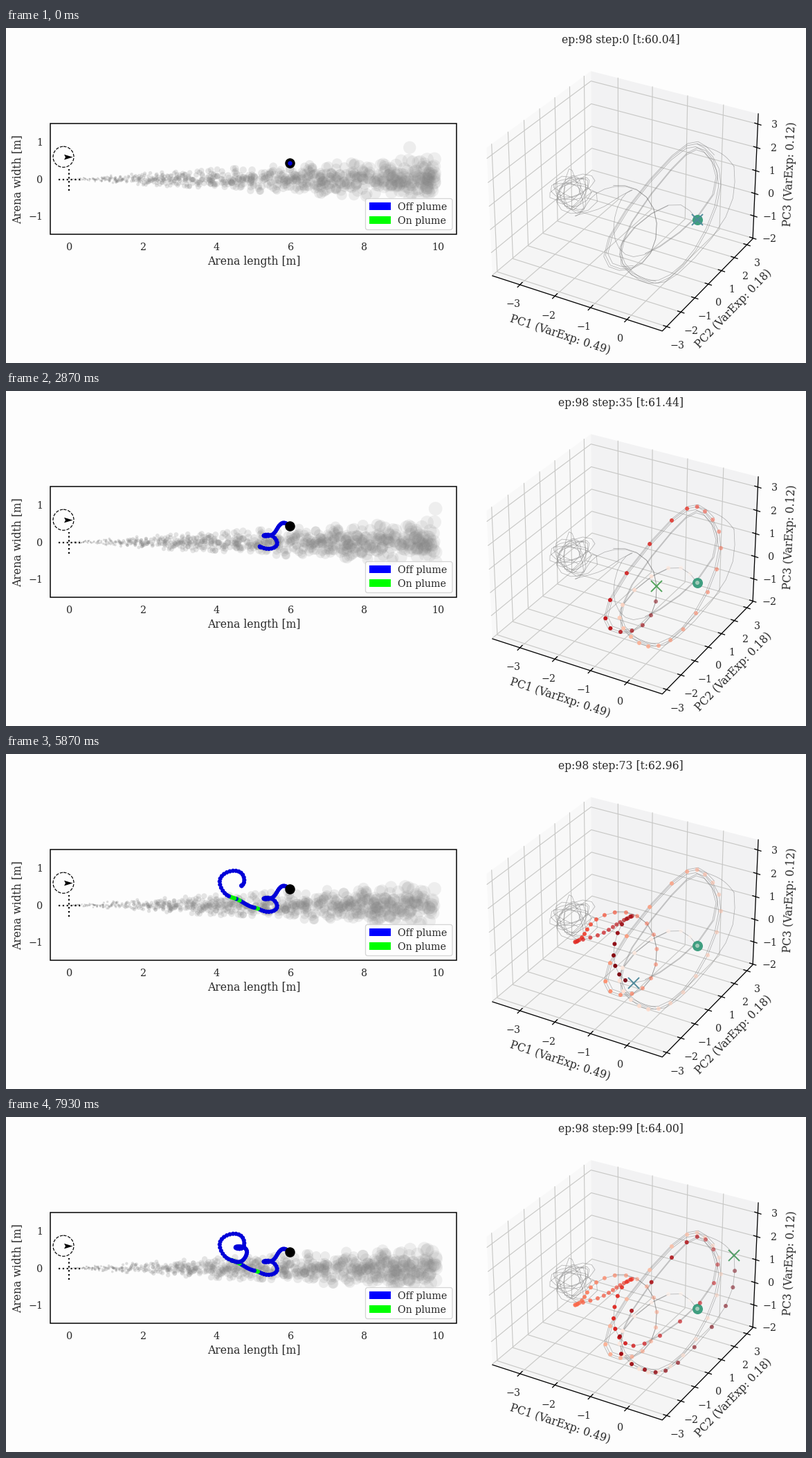
A matplotlib script for the animation above (8 s loop, 1156 by 484 pixels).

```python
import numpy as np
import matplotlib
import matplotlib.pyplot as plt
from matplotlib.animation import FuncAnimation
from matplotlib.patches import Circle, FancyBboxPatch, Polygon, Rectangle

W, H = 1156, 484
N, LOOP_MS = 100, 8000       # one simulation step per frame
INK, BLUE, GREEN, TEAL = "#262626", "#0000d8", "#00f000", "#3f9e80"
TICK, LABEL = 14.2, 15.6
M = 53.3                     # pixels per metre
OX, OY = 91.3, 218.3         # plume source in pixels

plt.rcParams["font.family"] = "DejaVu Serif"
rng = np.random.default_rng(98)
STEPS = np.arange(N)

# One point equals one pixel; all drawing is in pixel coordinates.
fig = plt.figure(figsize=(W / 72, H / 72), dpi=72, facecolor="#fdfdfd")
ax = fig.add_axes([0, 0, 1, 1])
ax.set(xlim=(0, W), ylim=(H, 0))
ax.axis("off")


def text(x, y, s, size=TICK, **kw):
    kw = {"ha": "center", "va": "baseline", **kw}
    return ax.text(x, y, s, size=size, color=INK, zorder=10, **kw)


def line(pts, color="black", lw=1.3, z=3, **kw):
    ax.plot(*np.array(pts, float).T, color=color, lw=lw, zorder=z, **kw)


def num(v):
    return str(v).replace("-", "\u2212")


def curve(pts, n=N):
    """n points along the natural cubic spline through evenly timed pts."""
    p = np.array(pts, float)
    c = len(p)
    a = 4 * np.eye(c) + np.eye(c, k=1) + np.eye(c, k=-1)
    a[0, 0] = a[-1, -1] = 2
    q = np.pad(p, ((1, 1), (0, 0)), "edge")
    m = np.linalg.solve(a, 3 * (q[2:] - q[:-2]))
    t = np.linspace(0, c - 1, n)
    k = np.minimum(t.astype(int), c - 2)
    u = (t - k)[:, None]
    return ((1 + 2 * u) * (1 - u) ** 2 * p[k] + u * (1 - u) ** 2 * m[k]
            + u * u * (3 - 2 * u) * p[k + 1] + u * u * (u - 1) * m[k + 1])


# ---------------------------------------------------------------- arena

def draw_arena():
    ax.add_patch(Rectangle((64.2, 138.3), 586.8, 160, fill=False, ec="black",
                           lw=1.5, zorder=8))
    for v in range(0, 11, 2):
        text(OX + M * v, 321.4, num(v))
    for v in (-1, 0, 1):
        text(53, OY - M * v + 5.2, num(v), ha="right")
    text(358.3, 342.4, "Arena length [m]", LABEL)
    text(21.5, 219, "Arena width [m]", LABEL, rotation=90,
         rotation_mode="anchor")

    # wind compass and source cross
    ax.add_patch(Circle((83, 186.2), 15, fill=False, ec="black", lw=1.2,
                        ls="--", zorder=5))
    ax.add_patch(Polygon([(84, 182.8), (96.5, 186.6), (84, 190.4), (86, 186.6)],
                         fc="black", lw=0, zorder=5))
    line([(76.4, 218.5), (107, 218.5)], lw=2.2, z=5, ls=":")
    line([(91.3, 235), (91.3, 204)], lw=2.2, z=5, ls=":")

    ax.add_patch(FancyBboxPatch((522.5, 249.5), 119.5, 39, fc="white",
                                boxstyle="round,pad=3", ec="#cccccc",
                                alpha=0.8, lw=1.3, zorder=9))
    for y, c, s in ((252, "#0000ff", "Off plume"), (272, "#00ff00", "On plume")):
        ax.add_patch(Rectangle((525, y), 30.5, 11, fc=c, lw=0, zorder=10))
        text(566, y + 11, s, ha="left")


# ---------------------------------------------------------------- 3D box

BOX = np.array([4, 4, 3]) * 1.82946 / np.sqrt(41)
LO, HI = np.array([-3.8, -3.3, -2.03]), np.array([0.95, 3.48, 3.43])
AZ, EL = np.radians(-60), np.radians(30)
SIDE = np.array([-np.sin(AZ), np.cos(AZ), 0])
EYE = np.array([np.cos(EL) * np.cos(AZ), np.cos(EL) * np.sin(AZ), np.sin(EL)])
UP = np.cross(EYE, SIDE)


def proj(*p):
    d = ((np.array(p) - LO) / (HI - LO) - 0.5) * BOX
    k = 246 * 10 / (10 - d @ EYE)
    return np.array([894.4 + k * (d @ SIDE), 241.4 - k * (d @ UP)])


def tick(p, direction, label, offset):
    d = np.array(direction) / np.hypot(*direction) * 4.8
    line([p - d, p + d], z=4)
    text(p[0] + offset[0], p[1] + offset[1] + 5.2, num(label))


def draw_box():
    (x0, y0, z0), (x1, y1, z1) = LO, HI
    left, front = proj(x0, y0, z0), proj(x1, y0, z0)
    right, back = proj(x1, y1, z0), proj(x0, y1, z0)
    top_left, top_back = proj(x0, y0, z1), proj(x0, y1, z1)
    top_right = proj(x1, y1, z1)
    for c, quad in (("#f8f8f8", [left, top_left, top_back, back]),
                    ("#f2f2f3", [back, top_back, top_right, right]),
                    ("#f5f5f5", [left, front, right, back])):
        ax.add_patch(Polygon(quad, fc=c, lw=0, zorder=1))

    grid = dict(color="#c8c8c6", lw=1.15, z=2)
    along_x, along_y = front - left, right - front
    for v in range(-3, 1):
        line([proj(v, y0, z0), proj(v, y1, z0), proj(v, y1, z1)], **grid)
        tick(proj(v, y0, z0), along_y, v, (-9.5, 27))
    for v in range(-3, 4):
        line([proj(x1, v, z0), proj(x0, v, z0), proj(x0, v, z1)], **grid)
        tick(proj(x1, v, z0), along_x, v, (15, 26))
    for v in range(-2, 4):
        line([proj(x0, y0, v), proj(x0, y1, v), proj(x1, y1, v)], **grid)
        tick(proj(x1, y1, v), along_x, v, (23.8, 0))
    line([left, front, right, top_right])

    for x, y, s, rot in ((801, 443.5, "PC1 (VarExp: 0.49)", -18),
                         (1051, 406, "PC2 (VarExp: 0.18)", 46),
                         (1133, 211, "PC3 (VarExp: 0.12)", 87.5)):
        text(x, y, s, LABEL, va="center", rotation=rot)


# ---------------------------------------------------------------- paths

trail_xy = curve([
    (410, 194.5), (401, 190.5), (393, 197), (384, 208), (372.5, 209),
    (384, 209), (391.5, 222), (378, 228), (364, 223.5), (352.5, 220),
    (340, 213), (329, 208), (316, 201), (309, 182), (323.5, 169.5),
    (341, 173), (342.5, 188.5), (332, 189), (338, 187), (347.5, 192),
    (345.5, 203), (337, 209.5), (326, 207)])
trail_rgb = np.where(np.isin(STEPS, (36, 37, 46, 47, 49, 50, 51)), GREEN, BLUE)

orbit = curve([
    (999, 277), (957, 256), (891, 309), (903, 355), (943, 368), (997, 321),
    (1033, 227), (1010, 174), (962, 187), (873, 302), (888, 348), (932, 324),
    (936, 261), (896, 229), (853, 239), (836, 260), (825, 271), (826, 270),
    (855, 262), (877, 250), (893, 240), (905, 234), (890, 246), (878, 291),
    (895, 327), (945, 316), (1023, 240), (1011, 177), (962, 203), (887, 317),
    (923, 365), (971, 355), (1040, 273), (1052, 200)])

# The orbit rises at the far side of the box, so rising dots are fainter.
heading = np.gradient(orbit, axis=0)
heading /= np.hypot(*heading.T)[:, None]
shade = 0.75 + 0.25 * heading @ (0.3, 0.95)

mix = np.cos(np.pi * STEPS / 73)[:, None] ** 2
cross_rgb = ((1 - mix) * (82, 162, 90) + mix * (80, 138, 155)) / 255
REDS = matplotlib.colormaps["Reds"]


def draw_threads():
    style = dict(color="#6e6e6e", lw=0.75, z=3.5, alpha=0.5)
    line(orbit, **style)
    line(curve([orbit[-1], (1033, 181), orbit[22]], 20), **style)

    # earlier laps: parts of the same orbit, slightly resized
    hub = np.array([950, 272])
    for start, stop, scale in ((3, 32, 0.96), (20, 41, 1.03), (74, 92, 0.97)):
        line(hub + scale * (orbit[start:stop] - hub), **style)

    # tangled knot on the left
    n = 34
    a = np.cumsum(rng.uniform(0.8, 2.8, n))
    r = rng.uniform(0.3, 1.1, n)
    knot = np.stack([817 + 36 * r * np.cos(a), 237 + 30 * r * np.sin(a)], 1)
    line(curve(knot, 3 * n), **style)


# ---------------------------------------------------------------- plume

puff_x = rng.uniform(-110, 528, 900)
puff_z = np.clip(rng.normal(size=puff_x.size), -2.1, 2.1)
puff_x[0], puff_z[0] = 492, -3.5      # one stray puff


def plume_state(step):
    x = puff_x + 0.02 * M * step
    seen = (x > 5) & (x < 530)
    m = x[seen] / M
    xy = np.stack([OX + x[seen], OY + puff_z[seen] * 2.2 * m ** 0.8], axis=1)
    size = (2 * (0.7 + 0.92 * m)) ** 2
    rgba = np.full((m.size, 4), 0.5)
    rgba[:, 3] = 0.32 / (1 + 0.18 * m)
    return xy, size, rgba


draw_arena()
draw_box()
draw_threads()

title = text(888.5, 21.5, "", LABEL)
puffs = ax.scatter([], [], lw=0, zorder=2)
trail = ax.scatter([], [], s=38, lw=0, zorder=6)
ax.scatter(*trail_xy[0], s=14.5 ** 2, c="black", lw=0, zorder=6.5)
head = ax.scatter([], [], s=42, lw=0, zorder=7)
ax.scatter(*orbit[0], s=15 ** 2, c=TEAL, lw=0, zorder=5)
dots = ax.scatter([], [], s=36, lw=0, zorder=6)
cross, = ax.plot([], [], "x", ms=16, mew=1.9, zorder=7)


def draw(step):
    n = step + 1
    title.set_text(f"ep:98 step:{step} [t:{60.04 + 0.04 * step:.2f}]")

    xy, size, rgba = plume_state(step)
    puffs.set_offsets(xy)
    puffs.set_sizes(size)
    puffs.set_facecolors(rgba)

    trail.set_offsets(trail_xy[:n])
    trail.set_facecolors(trail_rgb[:n])
    head.set_offsets(trail_xy[step:n])
    head.set_facecolors(trail_rgb[step:n])

    # the newest step carries the cross instead of a dot
    colors = REDS(STEPS[:step] / n)
    colors[:, 3] = shade[:step]
    dots.set_offsets(orbit[:step])
    dots.set_facecolors(colors)
    cross.set_data(orbit[step:n, 0], orbit[step:n, 1])
    cross.set_color(cross_rgb[step])
    return title, puffs, trail, head, dots, cross


anim = FuncAnimation(fig, draw, frames=N, interval=LOOP_MS / N,
                     repeat=True, repeat_delay=0, blit=False)
plt.show()
```
